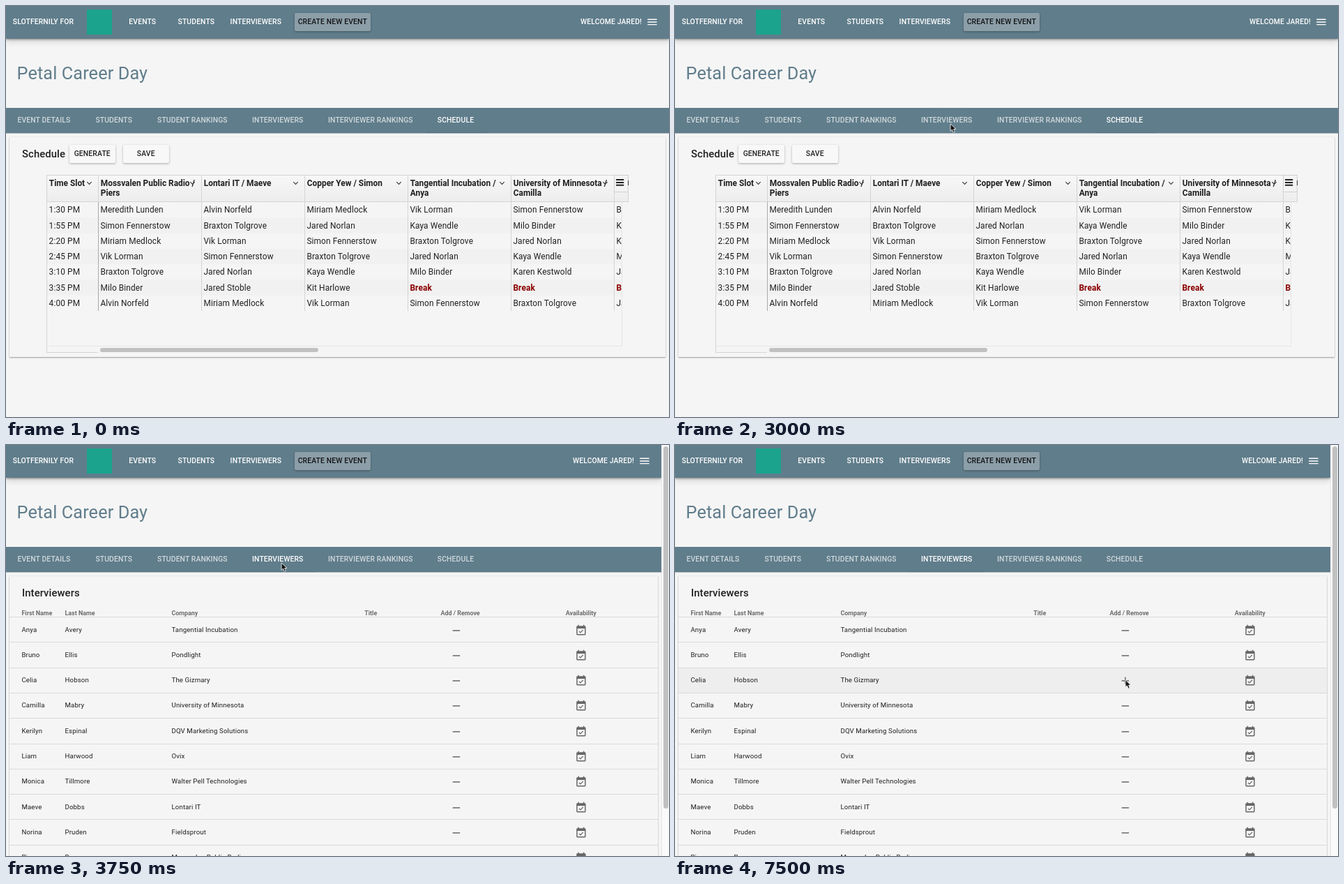
An HTML page that plays this animation: 951 px wide and 589 px high, repeating every 8000 ms.

```html
<!DOCTYPE html>
<html lang="en">
<head>
<meta charset="utf-8">
<title>Interview schedule</title>
<style>
html, body { margin: 0; width: 100%; height: 100%; overflow: hidden; }
body {
  position: relative; background: #f5f5f5; color: rgba(0,0,0,.87);
  font: 400 11.89px Roboto, Arial, sans-serif; letter-spacing: .01em;
}
div, span, svg { position: absolute; box-sizing: border-box; }
span { line-height: 20px; margin-top: -10px; white-space: nowrap; }

.bar, .tabs, .btn { font-size: 10.4px; font-weight: 500; text-transform: uppercase; }
#page { left: 0; top: 0; width: 951px; height: 589px; overflow: hidden; animation: shrink 8s step-end infinite; }
.bar {
  left: 0; top: 0; width: 100%; height: 46.5px; background: #607d8b; color: #fff;
  box-shadow: 0 1px 3px rgba(0,0,0,.4), 0 4px 9px rgba(0,0,0,.14);
}
.mark { left: 116px; top: 5px; width: 36px; height: 36px; background: #1ba38d; }
.btn { height: 26px; line-height: 26px; text-align: center; border-radius: 2px; background: #f8f8f8; box-shadow: 0 1px 3px rgba(0,0,0,.32); }
.bar .btn { left: 414px; top: 10px; width: 108.5px; background: #8c9ea8; color: rgba(0,0,0,.87); }
.title { left: 15.5px; top: 96.5px; font-size: 25.26px; color: #607d8b; }

.tabs {
  left: 0; top: 146px; width: 100%; height: 36px; background: #607d8b; color: rgba(255,255,255,.7);
  box-shadow: 0 1px rgba(84,110,122,.4);
}
.tabs span { top: 17.7px; }
#tabIn { animation: tabIn 8s step-end infinite; }
#tabOut { animation: tabOut 8s step-end infinite; }
.ink { left: 602px; top: 34.5px; width: 87.5px; height: 1.5px; background: #54707d; animation: ink 8s step-end infinite; }
.press { left: 336px; top: 0; width: 109px; height: 36px; overflow: hidden; }
.press div {
  left: 9px; top: -21px; width: 100px; height: 100px; border-radius: 50%;
  background: #fff; opacity: 0; animation: press 8s step-end infinite;
}

.view { left: 0; top: 182px; width: 100%; height: 407px; overflow: hidden; animation: viewClip 8s step-end infinite; }
.pane { left: 0; top: -182px; width: 100%; height: 589px; }
#sched { animation: schedOut 8s step-end infinite; }
#people { animation: peopleIn 8s step-end infinite; }
.card {
  left: 5px; right: 5px; top: 188px;
  box-shadow: 0 1px 2px rgba(0,0,0,.22), 0 1px 1px rgba(0,0,0,.14), 0 0 1px rgba(0,0,0,.16);
}
.head { left: 23px; top: 212px; font-size: 14.86px; font-weight: 500; letter-spacing: .005em; }

.gridHead { left: 58px; top: 242px; width: 835px; height: 39px; border: solid #d4d4d4; border-width: 1px 1px 1px 0; background: linear-gradient(#f7f7f7, #ededed); }
.gridHead span { font-weight: 700; letter-spacing: 0; }
.gridBody { left: 58px; top: 281px; width: 826px; height: 206.5px; overflow: hidden; border: solid #e6e6e6; border-width: 0 1px 1px 0; }
.row { left: 0; width: 100%; height: 22.25px; }
.row:nth-child(even) { background: #f1f1f1; }
.row span { top: 11.3px; }
.break { color: #8b0000; font-weight: 700; }
.rule { width: 1px; background: #d4d4d4; }
.thumb { left: 135px; top: 489.5px; width: 312.5px; height: 6px; border-radius: 3px; background: #c1c1c1; }
.menu { left: 872px; top: 242px; width: 20.5px; height: 25px; background: #f3f3f3; border: 1px solid #d0d0d0; }
.focus { left: 870.5px; top: 242px; width: 23px; height: 20px; border: 2px solid #8e8e8e; border-radius: 2px; opacity: 0; animation: focus 8s step-end infinite; }

.th { top: 240.5px; font-size: 8.92px; font-weight: 700; letter-spacing: 0; color: rgba(0,0,0,.56); }
.mid { transform: translateX(-50%); }
.person { left: 0; width: 100%; height: 36.3px; border-top: 1px solid #dadada; font-size: 9.66px; }
.person span { top: 17.6px; }
.hover1 { animation: hover1 8s step-end infinite; }
.hover2 { animation: hover2 8s step-end infinite; }
.hover3 { animation: hover3 8s step-end infinite; }
.icon { fill: #666; width: 17.83px; height: 17.83px; }
.person .icon { top: 9.6px; margin-left: -8.9px; }
.plus { opacity: 0; animation: plus 8s step-end infinite; }

.scroll { right: 0; top: 0; width: 11px; height: 100%; background: #fafafa; border-left: 1px solid #e4e4e4; opacity: 0; animation: scroll 8s step-end infinite; }
.scroll div { left: 2px; top: 2px; width: 6.5px; height: 519px; border-radius: 3.5px; background: #c1c1c1; }
#cursor { left: 0; top: 0; animation: cursor 8s step-end infinite; }

@keyframes shrink { 0% { width: 951px } 43.75%, 100% { width: 940px } }
@keyframes scroll { 0% { opacity: 0 } 43.75%, 100% { opacity: 1 } }
@keyframes tabIn { 0% { color: rgba(255,255,255,.7) } 40.625%, 100% { color: #fff } }
@keyframes tabOut { 0% { color: #fff } 40.625%, 100% { color: rgba(255,255,255,.7) } }
@keyframes ink {
  0% { left: 602px; width: 87.5px }
  40.625% { left: 363px; width: 225px }
  43.75%, 100% { left: 336px; width: 109px }
}
@keyframes press {
  0% { opacity: 0 }
  37.5% { opacity: .015; transform: scale(.64) }
  40.625% { opacity: .06; transform: none }
  43.75%, 100% { opacity: 0 }
}
@keyframes viewClip { 0% { height: 407px } 40.625% { height: 366px } 43.75%, 100% { height: 407px } }
@keyframes schedOut {
  0% { transform: none }
  40.625% { transform: translateX(212px) }
  43.75% { transform: translateX(905px) }
  46.875%, 100% { transform: translateX(951px) }
}
@keyframes peopleIn {
  0% { transform: translateX(-951px) }
  40.625% { transform: translateX(-741px) }
  43.75% { transform: translateX(-36px) }
  46.875%, 100% { transform: none }
}
@keyframes focus { 0% { opacity: 0 } 15.625% { opacity: 1 } 37.5%, 100% { opacity: 0 } }
@keyframes hover1 {
  0% { background: #f5f5f5 }
  56.25% { background: #f1f1f1 }
  59.375% { background: #ededed }
  65.625%, 100% { background: #f5f5f5 }
}
@keyframes hover2 { 0% { background: #f5f5f5 } 65.625% { background: #ededed } 68.75%, 100% { background: #f5f5f5 } }
@keyframes hover3 { 0% { background: #f5f5f5 } 68.75%, 100% { background: #eee } }
@keyframes plus { 0% { opacity: 0 } 81.25%, 100% { opacity: 1 } }
@keyframes cursor {
  0% { transform: translate(-20px, -20px) }
  6.25% { transform: translate(437px, 47.5px) }
  9.375% { transform: translate(373px, 158px) }
  12.5% { transform: translate(440px, 207.5px) }
  21.875% { transform: translate(435px, 208px) }
  25% { transform: translate(413px, 195px) }
  28.125% { transform: translate(396px, 172.5px) }
  31.25% { transform: translate(394px, 168px) }
  53.125% { transform: translate(389px, 190px) }
  56.25% { transform: translate(386px, 259px) }
  62.5% { transform: translate(410px, 291px) }
  65.625% { transform: translate(522.5px, 323px) }
  68.75% { transform: translate(626px, 335px) }
  71.875%, 100% { transform: translate(645px, 335.7px) }
}
</style>
</head>
<body>
<div id="page">
  <div class="bar">
    <span style="left:9.8px;top:23.3px">Slotfernily for</span>
    <div class="mark"></div>
    <span style="left:176.3px;top:23.3px">Events</span>
    <span style="left:246.5px;top:23.3px">Students</span>
    <span style="left:321.6px;top:23.3px">Interviewers</span>
    <div class="btn">Create new event</div>
    <span style="right:39px;top:22.7px">Welcome Jared!</span>
    <svg class="icon" viewBox="0 0 24 24" style="right:15.3px;top:14.1px;fill:#fff"><path d="M3 18h18v-2H3zm0-5h18v-2H3zm0-7v2h18V6z"/></svg>
  </div>
  <span class="title">Petal Career Day</span>
  <div class="tabs">
    <div class="press"><div></div></div>
    <span style="left:16.4px">Event details</span>
    <span style="left:128.4px">Students</span>
    <span style="left:217px">Student rankings</span>
    <span style="left:353px" id="tabIn">Interviewers</span>
    <span style="left:462px">Interviewer rankings</span>
    <span style="left:618.8px" id="tabOut">Schedule</span>
    <div class="ink"></div>
  </div>
  <div class="view">
    <div class="pane" id="sched">
      <div class="card" style="height:315px"></div>
      <span class="head">Schedule</span>
      <div class="btn" style="left:91px;top:199px;width:65.5px">Generate</div>
      <div class="btn" style="left:168px;top:199px;width:65.5px">Save</div>
      <div class="gridHead"></div>
      <div class="gridBody"></div>
      <div class="rule" style="left:58px;top:242px;height:255px"></div>
      <div class="rule" style="left:58px;top:496px;height:1px;width:74px"></div>
      <div class="thumb"></div>
      <div class="menu"></div>
      <div class="focus"></div>
      <svg class="icon" viewBox="0 0 24 24" style="left:872px;top:243.5px;width:18px;fill:#222"><path d="M4 18.5h15v-2.6H4zm0-5.2h15v-2.6H4zm0-7.8v2.6h15V5.5z"/></svg>
      <div style="left:892px;top:250px;width:1px;height:7px;background:#333"></div>
    </div>
    <div class="pane" id="people">
      <div class="card" id="list" style="height:460px"></div>
      <span class="head">Interviewers</span>
    </div>
  </div>
</div>
<div class="scroll"><div></div></div>
<svg id="cursor" width="11" height="16"><path d="M1.1 .9V11.3L3.5 9.1 5.2 13.3 7.3 12.4 5.6 8.5H9Z" fill="#111" stroke="#fff" stroke-width=".8"/></svg>

<script>
const $ = q => document.querySelector(q);
const add = (box, html) => box.insertAdjacentHTML('beforeend', html);
const label = (x, text, extra = '') => `<span style="left:${x};${extra}">${text}</span>`;

// Schedule grid
const names = {
  D: 'Meredith Lunden', A: 'Alvin Norfeld', M: 'Miriam Medlock', V: 'Vik Lorman',
  S: 'Simon Fennerstow', B: 'Braxton Tolgrove', J: 'Jared Norlan', K: 'Kaya Wendle',
  T: 'Milo Binder', W: 'Karen Kestwold', P: 'Jared Stoble', H: 'Kit Harlowe', X: 'Break'
};
const slots = {
  '1:30': 'DAMVSB', '1:55': 'SBJKTK', '2:20': 'MVSBJK', '2:45': 'VSBJKT',
  '3:10': 'BJKTWJ', '3:35': 'TPHXXX', '4:00': 'AMVSBJ'
};
const heads = [
  ['Time Slot'], ['Mossvalen Public Radio /', 'Piers'], ['Lontari IT / Maeve'],
  ['Copper Yew / Simon'], ['Tangential Incubation /', 'Anya'], ['University of Minnesota /', 'Camilla']
];
const colX = i => i ? 74 + 148 * (i - 1) : 0;
const body = $('.gridBody');

Object.entries(slots).forEach(([time, keys], r) => {
  const cells = [...keys].map((k, i) =>
    `<span class="${k === 'X' ? 'break' : ''}" style="left:${colX(i + 1) + 3.4}px">${names[k]}</span>`);
  add(body, `<div class="row" style="top:${r * 22.25}px">${label('3.6px', time + ' PM')}${cells.join('')}</div>`);
});

heads.forEach((lines, i) => {
  const x = colX(i), end = colX(i + 1);
  lines.forEach((text, n) => add($('.gridHead'), label(x + 3.8 + 'px', text, `top:${10.5 + 14 * n}px`)));
  add($('.gridHead'), `<svg width="9" height="6" style="left:${end - 17}px;top:7.5px">
    <path d="M1.3 1.2 4.5 4.4 7.7 1.2" fill="none" stroke="#333" stroke-width="1.1"/></svg>`);
  add($('.gridHead'), `<div class="rule" style="left:${end}px;top:0;height:38px"></div>`);
  add(body, `<div class="rule" style="left:${end}px;top:0;height:156px;${i ? '' : 'background:#aaa'}"></div>`);
});

// Interviewer list
const people = [
  'Anya|Avery|Tangential Incubation', 'Bruno|Ellis|Pondlight', 'Celia|Hobson|The Gizmary',
  'Camilla|Mabry|University of Minnesota', 'Kerilyn|Espinal|DQV Marketing Solutions',
  'Liam|Harwood|Ovix', 'Monica|Tillmore|Walter Pell Technologies', 'Maeve|Dobbs|Lontari IT',
  'Norina|Pruden|Fieldsprout', 'Piers|Rowan|Mossvalen Public Radio'
];
const cols = ['17.4px', '8.55%', '25%', '54.75%', '66.5%'];
const list = $('#list');
const icon = (x, d, cls = '') => `<svg class="icon ${cls}" viewBox="0 0 24 24" style="left:${x}"><path d="${d}"/></svg>`;
const minus = 'M19 13H5v-2h14z', upright = 'M11 5h2v14h-2z';
const calendar = 'M16.53 11.06 15.47 10l-4.88 4.88-2.12-2.12-1.06 1.06L10.59 17zM19 3h-1V1h-2v2H8V1H6v2H5a2 2 0 0 0-2 2v14a2 2 0 0 0 2 2h14a2 2 0 0 0 2-2V5a2 2 0 0 0-2-2zm0 16H5V8h14z';

['First Name', 'Last Name', 'Company', 'Title', 'Add / Remove'].forEach((text, i) =>
  add(list, `<span class="th" style="left:${cols[i]};top:52.5px">${text}</span>`));
add(list, '<span class="th mid" style="left:88.15%;top:52.5px">Availability</span>');

people.forEach((p, i) => {
  const text = p.split('|').map((t, c) => label(cols[c], t)).join('');
  add(list, `<div class="person hover${i + 1}" style="top:${58 + i * 36.3}px">${text}
    ${icon('68.9%', minus)}${i === 2 ? icon('68.9%', upright, 'plus') : ''}${icon('88.15%', calendar)}</div>`);
});
</script>
</body>
</html>
```
